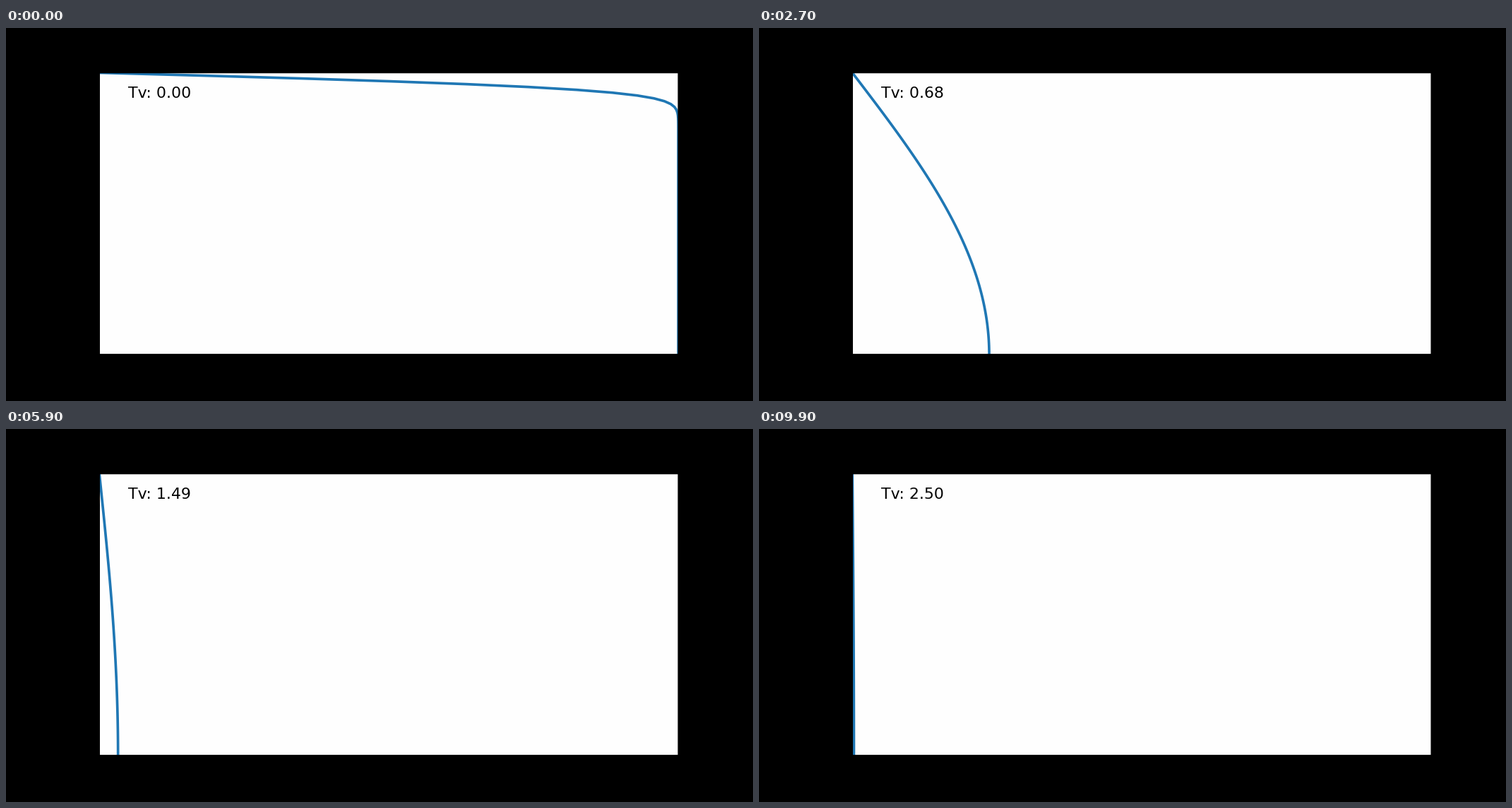
Write a matplotlib script that moves like this. It is 1058x529 px and loops after 10000 ms.

```python
import numpy as np
import matplotlib.pyplot as plt
from matplotlib.animation import FuncAnimation

W, H, DPI = 1058, 529, 132.25
FRAMES, INTERVAL = 100, 100

depth = np.linspace(0, 1, 100)
times = np.linspace(0.001, 2.5, FRAMES)
M = np.pi / 2 * (2 * np.arange(100) + 1)
modes = 2 / M * np.sin(np.outer(depth, M))


def pressure(tv):
    """Excess pore pressure over depth, one-way drainage at the top."""
    return modes @ np.exp(-M**2 * tv)


fig, ax = plt.subplots(figsize=(W / DPI, H / DPI), dpi=DPI, facecolor="black")
fig.subplots_adjust(left=0.125, right=0.9, bottom=0.125, top=0.88)
ax.set(xlim=(0, 1), ylim=(1, 0), xticks=[], yticks=[], facecolor="#fefefe")

# Keep the frame at its exact sub-pixel place
for part in (ax.patch, *ax.spines.values()):
    part.set_snap(False)

line, = ax.plot([], [], color="#1f77b4", lw=2)
label = ax.text(0.05, 0.95, "", transform=ax.transAxes, va="top",
                fontsize=12, family="DejaVu Sans", color="black")


def update(i):
    tv = times[i]
    line.set_data(pressure(tv), depth)
    label.set_text(f"Tv: {tv:.2f}")
    return line, label


anim = FuncAnimation(fig, update, frames=FRAMES, interval=INTERVAL,
                     init_func=lambda: update(0), repeat=True, repeat_delay=0)
plt.show()
```
